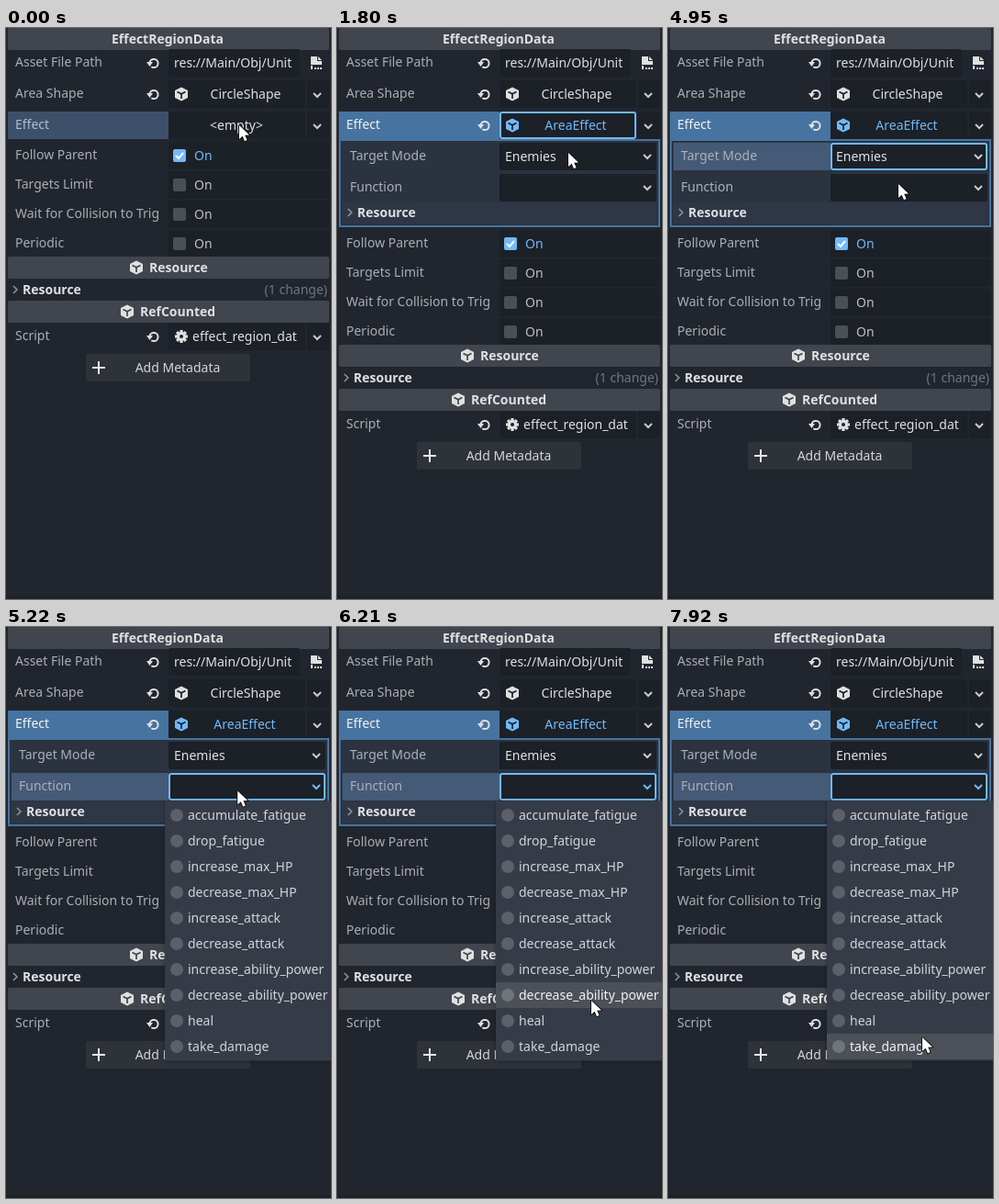
Write an HTML page with a canvas that moves like this. It is 354 px wide and 622 px high and loops after 8000 ms.

```html
<!DOCTYPE html>
<html lang="en">
<head>
<meta charset="utf-8">
<title>Inspector</title>
<style>
html, body { margin: 0; width: 100%; height: 100%; overflow: hidden; background: #21262e; }
canvas { display: block; }
</style>
</head>
<body>
<canvas id="stage" width="354" height="622"></canvas>
<script>
const ctx = document.getElementById('stage').getContext('2d');
const LOOP = 8000, STEP = 90;
const C = {
  panel: '#21262e', field: '#1c2027', header: '#41454d', button: '#2e3239', sub: '#2b3340',
  subHeader: '#2f3746', frame: '#46739f', hover: '#3c5169', subHover: '#455a77',
  popup: '#363c47', popupHover: '#4c5159', accent: '#70bafa', label: '#abaeb3',
  value: '#dfe0e2', bright: '#f2f3f4', muted: '#70757c', box: '#4b4f56', radio: '#5c6068'
};
const FUNCTIONS = ['accumulate_fatigue', 'drop_fatigue', 'increase_max_HP', 'decrease_max_HP',
  'increase_attack', 'decrease_attack', 'increase_ability_power', 'decrease_ability_power',
  'heal', 'take_damage'];

// Pointer path: time, x, y
const PATH = [
  [0, 254, 106], [900, 254, 106], [1260, 252, 136], [2340, 252, 136], [2700, 253, 141],
  [3600, 253, 141], [3960, 251, 198], [4230, 251, 198], [4590, 251, 170], [5130, 251, 170],
  [5490, 256, 204], [5760, 260, 234], [6210, 277, 407], [6300, 277, 428], [7200, 277, 428],
  [7470, 277, 447], [LOOP, 277, 447]
];

function pointerAt(t) {
  const i = PATH.findIndex(p => p[0] > t);
  const [t0, x0, y0] = PATH[i - 1], [t1, x1, y1] = PATH[i];
  const k = (t - t0) / (t1 - t0);
  return { x: x0 + (x1 - x0) * k, y: y0 + (y1 - y0) * k };
}

function rect(x, y, w, h, color, radius = 0) {
  ctx.fillStyle = color;
  ctx.beginPath();
  ctx.roundRect(x, y, w, h, radius);
  ctx.fill();
}

function outline(x, y, w, h, color, radius = 2) {
  ctx.strokeStyle = color;
  ctx.lineWidth = 2;
  ctx.beginPath();
  ctx.roundRect(x + 1, y + 1, w - 2, h - 2, radius);
  ctx.stroke();
}

function text(str, x, y, color = C.label, align = 'left', weight = 400) {
  ctx.font = `${weight} 14px "Noto Sans", sans-serif`;
  ctx.textAlign = align;
  ctx.fillStyle = color;
  ctx.fillText(str, x, y + 5);
}

function line(points, color, width = 2) {
  ctx.strokeStyle = color;
  ctx.lineWidth = width;
  ctx.beginPath();
  points.forEach(([x, y]) => ctx.lineTo(x, y));
  ctx.stroke();
}

function polygon(points, color) {
  ctx.fillStyle = color;
  ctx.beginPath();
  points.forEach(([x, y]) => ctx.lineTo(x, y));
  ctx.fill();
}

function circle(x, y, r, color) {
  ctx.fillStyle = color;
  ctx.beginPath();
  ctx.arc(x, y, r, 0, Math.PI * 2);
  ctx.fill();
}

const chevron = (x, y, color = '#c9cbce') =>
  line([[x - 4, y - 2], [x, y + 2], [x + 4, y - 2]], color);
const foldArrow = (x, y) => line([[x - 2, y - 4], [x + 2, y], [x - 2, y + 4]], '#8c9096', 1.6);

function cube(x, y, color = '#e0e0e0', gap = C.field) {
  polygon([[x, y - 7.5], [x + 7, y - 4], [x + 7, y + 4], [x, y + 7.5], [x - 7, y + 4], [x - 7, y - 4]], color);
  line([[x - 4.5, y - 2.5], [x, y - 0.3], [x + 4.5, y - 2.5]], gap, 1.7);
  line([[x, y], [x, y + 5]], gap, 1.7);
}

function revert(y) {
  ctx.strokeStyle = '#e0e0e0';
  ctx.lineWidth = 2;
  ctx.beginPath();
  ctx.arc(161, y + 0.5, 4.6, Math.PI * 1.02, Math.PI * 2.7);
  ctx.stroke();
  polygon([[153, y - 1], [160, y - 1], [156.5, y + 4]], '#e0e0e0');
}

function gear(x, y) {
  ctx.save();
  ctx.translate(x, y);
  for (let i = 0; i < 4; i++) {
    rect(-1.6, -7, 3.2, 14, '#e0e0e0');
    ctx.rotate(Math.PI / 4);
  }
  ctx.restore();
  circle(x, y, 5, '#e0e0e0');
  circle(x, y, 2, C.field);
}

function fileIcon(x, y) {
  polygon([[x - 6, y - 7], [x + 1, y - 7], [x + 1, y - 2], [x + 6, y - 2], [x + 6, y + 2], [x - 6, y + 2]], '#e0e0e0');
  polygon([[x + 2, y - 7], [x + 6, y - 3], [x + 2, y - 3]], '#e0e0e0');
  rect(x - 6, y + 3, 2, 4, '#e0e0e0');
  for (const dx of [-2, 1, 4]) rect(x + dx, y + 5, 2, 2, '#e0e0e0');
}

function header(title, y, iconX) {
  rect(2, y - 12, 350, 24, C.header, 2);
  if (!iconX) return text(title, 176, y, C.value, 'center', 700);
  cube(iconX, y, '#e0e0e0', C.header);
  text(title, iconX + 14, y, C.value, 'left', 700);
}

function pickerField(y, split = true) {
  rect(177, y - 15, split ? 149 : 175, 30, C.field, 2);
  if (split) {
    rect(328, y - 15, 24, 30, C.field, 2);
    chevron(339, y + 1);
  }
}

function checkRow(label, y, on) {
  rect(177, y - 14, 175, 30, C.field, 2);
  text(label, 10, y);
  rect(182, y - 6, 14, 14, on ? C.accent : C.box, 2);
  if (on) line([[185, y + 1], [188, y + 4], [193, y - 2]], '#fff');
  text('On', 205, y + 1, on ? C.accent : '#bfc1c5');
}

function optionRow(label, value, y, { hovered, focused, open }) {
  if (hovered) rect(6, y - 14, 171, 30, C.subHover);
  text(label, 14, y, '#abb0b8');
  rect(177, y - 14, 171, 30, C.field, 2);
  text(value, 183, y + 1, open ? C.accent : C.value);
  chevron(338, y + 1, open ? C.accent : undefined);
  if (focused) outline(177, y - 14, 171, 30, C.accent);
}

function popupPanel(x, y, w, h) {
  ctx.save();
  ctx.shadowColor = 'rgba(0,0,0,.35)';
  ctx.shadowBlur = 4;
  rect(x, y, w, h, C.popup);
  ctx.restore();
}

function radioMenu(items, x, y, w, selected, pointer) {
  popupPanel(x, y, w, items.length * 28 + 3);
  items.forEach((item, i) => {
    const cy = y + 15.5 + i * 28;
    const hovered = Math.abs(pointer.y - cy) < 14;
    if (hovered) rect(x, cy - 14, w, 28, C.popupHover);
    circle(x + 13, cy, 7, i === selected ? C.accent : hovered ? '#70747b' : C.radio);
    if (i === selected) circle(x + 13, cy, 4, '#fff');
    text(item, x + 25, cy, hovered ? C.bright : '#d2d4d8');
  });
}

function createMenu(pointer) {
  popupPanel(196, 121, 156, 97);
  if (pointer.y > 122) rect(196, 123, 156, 28, C.popupHover);
  cube(212, 137, '#e0e0e0', C.popup);
  text('New AreaEffect', 226, 137, C.value);
  rect(202, 155, 144, 1, '#545a65');
  text('Quick Load...', 226, 174, C.value);
  text('Load...', 226, 202, C.value);
}

function subInspector(s) {
  rect(2, 121, 350, 95, C.sub);
  optionRow('Target Mode', 'Enemies', 139, { hovered: s.modeHover, focused: s.modeFocus, open: s.modeOpen });
  optionRow('Function', '', 173, { hovered: s.functionHover, focused: s.functionOpen, open: s.functionOpen });
  rect(6, 190, 342, 23, C.subHeader);
  foldArrow(14, 201);
  text('Resource', 22, 201, C.value, 'left', 700);
  outline(2, 121, 350, 96, C.frame, 0);
}

function drawPointer({ x, y }) {
  const shape = [[0, 0], [0, 15], [3.6, 11.8], [6, 17.2], [8.6, 16], [6.2, 10.8], [11, 10.5]]
    .map(([dx, dy]) => [x + dx, y + dy]);
  ctx.lineJoin = 'round';
  line([...shape, shape[0]], '#111', 2);
  polygon(shape, '#fff');
  ctx.lineJoin = 'miter';
}

function draw(t) {
  const pointer = pointerAt(t);
  const expanded = t >= 1710;
  const shift = expanded ? 96 : 0;
  const state = {
    modeHover: t >= 2430 && t < 5130,
    modeFocus: t >= 2700 && t < 5220,
    modeOpen: t >= 2700 && t < 4680,
    functionHover: t >= 5130,
    functionOpen: t >= 5220
  };

  rect(0, 0, 354, 622, C.panel);
  rect(0, 619, 354, 3, '#1d2128');
  header('EffectRegionData', 12);

  text('Asset File Path', 10, 37);
  revert(38);
  rect(177, 23, 143, 30, C.field, 2);
  text('res://Main/Obj/Unit', 183, 38, C.value);
  fileIcon(338, 38);

  text('Area Shape', 10, 71);
  revert(72);
  pickerField(72);
  cube(191, 72);
  text('CircleShape', 261, 72, C.value, 'center');

  rect(2, 91, 175, 30, expanded ? C.frame : C.hover);
  text('Effect', 10, 105, expanded ? C.bright : '#aebccb');
  pickerField(106);
  if (expanded) {
    revert(106);
    cube(191, 106, C.accent);
    text('AreaEffect', 260, 106, C.accent, 'center');
    subInspector(state);
    if (!state.modeFocus && !state.functionOpen) outline(177, 91, 149, 30, C.accent);
  } else {
    text('<empty>', 251, 106, C.value, 'center');
  }

  ctx.save();
  ctx.translate(0, shift);
  ['Follow Parent', 'Targets Limit', 'Wait for Collision to Trig', 'Periodic']
    .forEach((label, i) => checkRow(label, 138 + i * 32, i === 0));
  header('Resource', 261, 142);
  foldArrow(10, 285);
  text('Resource', 18, 285, C.value, 'left', 700);
  text('(1 change)', 350, 285, C.muted, 'right');
  header('RefCounted', 309, 132);
  text('Script', 10, 335);
  revert(336);
  pickerField(336);
  gear(191, 336);
  text('effect_region_dat', 203, 336, C.value);
  rect(87, 355, 179, 30, C.button, 2);
  rect(94, 369, 14, 2, '#e8e8e8');
  rect(100, 363, 2, 14, '#e8e8e8');
  text('Add Metadata', 187, 370, '#d4d6d9', 'center');
  ctx.restore();

  if (t >= 990 && !expanded) createMenu(pointer);
  if (state.modeOpen) radioMenu(['Enemies', 'Allies'], 177, 155, 97, 0, pointer);
  if (state.functionOpen) radioMenu(FUNCTIONS, 173, 189.5, 181, -1, pointer);
  drawPointer(pointer);
}

function tick() {
  draw(Math.floor((performance.now() % LOOP) / STEP) * STEP);
  requestAnimationFrame(tick);
}
tick();
</script>
</body>
</html>
```
